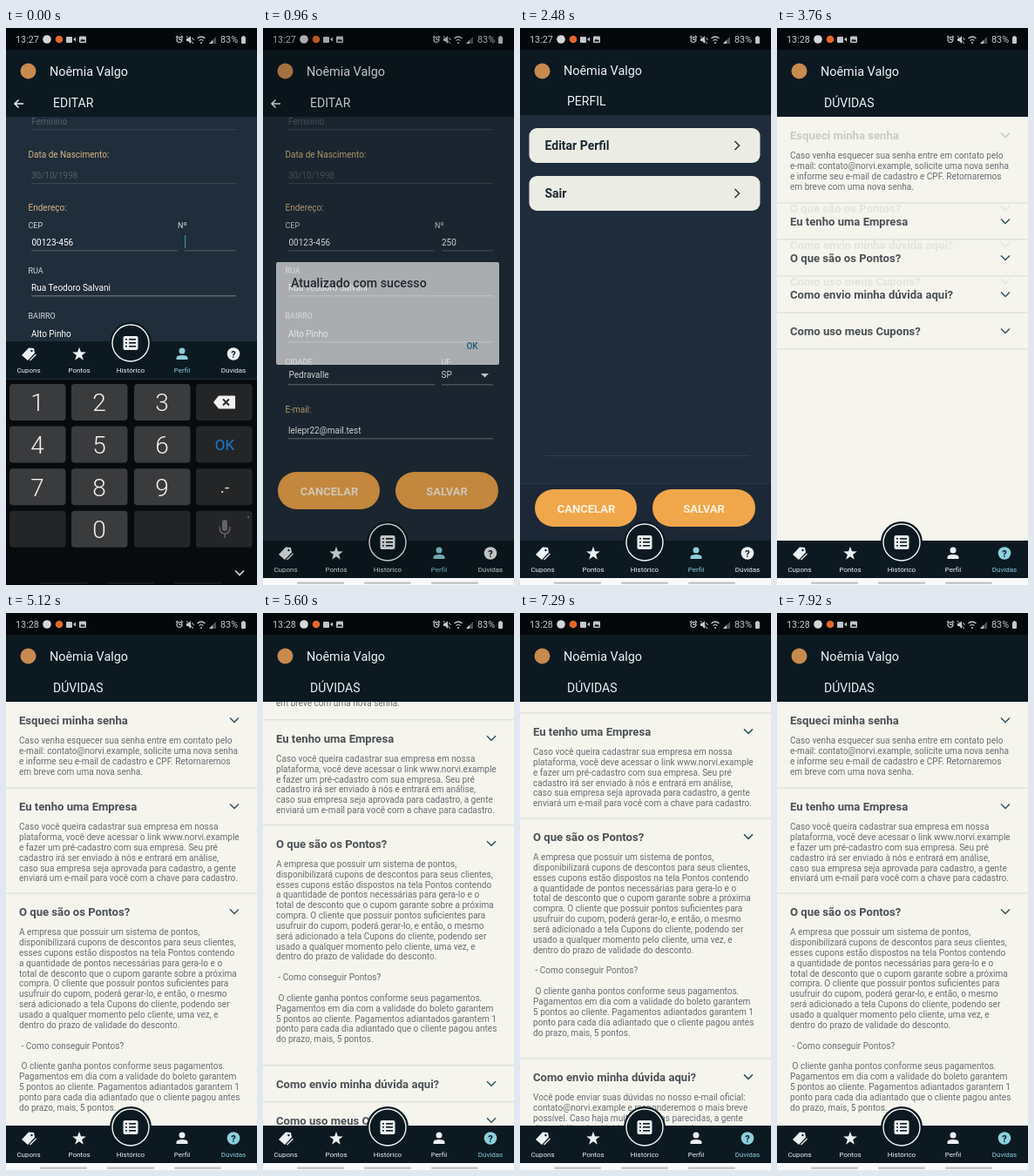
Animation, 288 px wide and 640 px high, one loop 8000 ms. Source, as an HTML page with a canvas:

```html
<!DOCTYPE html>
<html lang="pt-BR">
<head>
<meta charset="utf-8">
<title>Perfil e dúvidas</title>
<style>
  html, body { margin: 0; width: 100%; height: 100%; overflow: hidden; background: #000; }
  canvas { display: block; width: 100vw; height: 100vh; }
</style>
</head>
<body>
<canvas id="stage"></canvas>
<script>
const W = 288, H = 640, LOOP = 8000;
const canvas = document.getElementById('stage');
const dpr = window.devicePixelRatio || 1;
canvas.width = W * dpr;
canvas.height = H * dpr;
const c = canvas.getContext('2d');

const DARK = '#0c1921', BODY = '#202d3a', PAPER = '#f5f5ee', ACTIVE = '#8bd0dc';
const GOLD = '#d3b583', ORANGE = '#f0a64b', MUTED = '#535e69', WHITE = '#eef1f2';
const USER = 'Noêmia Valgo';

const FAQ = [
  { title: 'Esqueci minha senha', height: 57, opens: 3700, body:
`Caso venha esquecer sua senha entre em contato pelo
e-mail: contato@norvi.example, solicite uma nova senha
e informe seu e-mail de cadastro e CPF. Retornaremos
em breve com uma nova senha.` },
  { title: 'Eu tenho uma Empresa', height: 79, opens: 4250, body:
`Caso você queira cadastrar sua empresa em nossa
plataforma, você deve acessar o link www.norvi.example
e fazer um pré-cadastro com sua empresa. Seu pré
cadastro irá ser enviado à nós e entrará em análise,
caso sua empresa seja aprovada para cadastro, a gente
enviará um e-mail para você com a chave para cadastro.` },
  { title: 'O que são os Pontos?', height: 234, opens: 4800, body:
`A empresa que possuir um sistema de pontos,
disponibilizará cupons de descontos para seus clientes,
esses cupons estão dispostos na tela Pontos contendo
a quantidade de pontos necessárias para gera-lo e o
total de desconto que o cupom garante sobre a próxima
compra. O cliente que possuir pontos suficientes para
usufruir do cupom, poderá gerar-lo, e então, o mesmo
será adicionado a tela Cupons do cliente, podendo ser
usado a qualquer momento pelo cliente, uma vez, e
dentro do prazo de validade do desconto.

 - Como conseguir Pontos?

 O cliente ganha pontos conforme seus pagamentos.
Pagamentos em dia com a validade do boleto garantem
5 pontos ao cliente. Pagamentos adiantados garantem 1
ponto para cada dia adiantado que o cliente pagou antes
do prazo, mais, 5 pontos.` },
  { title: 'Como envio minha dúvida aqui?', height: 69, opens: 5950, body:
`Você pode enviar suas dúvidas no nosso e-mail oficial:
contato@norvi.example e responderemos o mais breve
possível. Caso haja muitas dúvidas parecidas, a gente
disponibilizará a dúvida nessa mesma tela para que
todos possam verificar.` },
  { title: 'Como uso meus Cupons?', height: 0, opens: Infinity, body: '' }
];

// Drawing helpers
const clamp = v => Math.max(0, Math.min(1, v));
const ramp = (t, from, to) => clamp((t - from) / (to - from));
const ease = (t, from, to) => { const p = ramp(t, from, to); return p * p * (3 - 2 * p); };

function text(s, x, y, size, color, weight = 400, align = 'left') {
  c.font = `${weight} ${size}px Roboto, sans-serif`;
  c.textAlign = align;
  c.fillStyle = color;
  c.fillText(s, x, y + size * 0.355);
}
function rect(x, y, w, h, color, radius = 0) {
  c.fillStyle = color;
  c.beginPath();
  c.roundRect(x, y, w, h, radius);
  c.fill();
}
function circle(x, y, r, color) {
  c.fillStyle = color;
  c.beginPath();
  c.arc(x, y, r, 0, Math.PI * 2);
  c.fill();
}
function path(d, color, width = 0) {
  const p = new Path2D(d);
  if (width) {
    c.strokeStyle = color;
    c.lineWidth = width;
    c.stroke(p);
  } else {
    c.fillStyle = color;
    c.fill(p);
  }
}
function at(x, y, draw) {
  c.save();
  c.translate(x, y);
  draw();
  c.restore();
}
function faded(alpha, draw) {
  c.save();
  c.globalAlpha *= alpha;
  draw();
  c.restore();
}

// Shared chrome
function statusBar(t) {
  const grey = '#c3c7c9';
  rect(0, 0, W, 25, '#04080b');
  text(t < 2960 ? '13:27' : '13:28', 11, 13.5, 10.8, grey);
  circle(47, 13, 4.8, '#d4d7d8');
  circle(61, 13, 4.3, '#e2682c');
  rect(69, 10, 7, 7, grey, 1);
  path('M77 13l3-2.5v5z', grey);
  rect(84, 9.5, 8, 7.5, grey, 1);
  path('M85 15.5l2-3 1.5 1.5 1.2-1 1.5 2.5z', '#111');
  at(199, 13.5, () => {
    path('M3 0a3 3 0 1 1-6 0a3 3 0 1 1 6 0M0-2v2h2M-4-2.5l2-2M4-2.5l-2-2', grey, 1.2);
  });
  path('M207 12h2l3-3v9l-3-3h-2z', grey);
  path('M207 9l8 9M213.5 11l2 3', grey, 1);
  path('M219.5 12q4.5-4 9 0M221.5 14.5q2.5-2 5 0', grey, 1.2);
  circle(224, 17, 1, grey);
  path('M233 18h8v-8z', '#4c5254');
  path('M233 18h4v-4z', grey);
  text('83%', 246, 13.5, 10.8, grey);
  rect(270, 10, 5, 8, grey, 1);
  rect(271.5, 9, 2, 2, grey);
}
function header(title, bottom, back) {
  rect(0, 25, W, bottom - 25, DARK);
  circle(25.5, 49.5, 9, '#c98a4e');
  text(USER, 50, bottom / 2 - 0.7, 14.4, WHITE);
  text(title, 54, bottom - 16, 14, WHITE);
  if (back) path('M20 87H10M14.5 82.5L10 87l4.5 4.5', WHITE, 1.5);
}
function navBar(y, active) {
  rect(0, y, W, 43, DARK);
  circle(143, y + 2, 24, DARK);
  c.beginPath();
  c.arc(143, y + 2, 21, 0, Math.PI * 2);
  c.strokeStyle = '#f2f4f4';
  c.lineWidth = 1.4;
  c.stroke();
  rect(134.5, y - 6, 17, 16, WHITE, 2);
  for (let row = 0; row < 3; row++) {
    rect(137, y - 3 + row * 4, 2, 1.6, DARK);
    rect(141, y - 3 + row * 4, 8, 1.6, DARK);
  }
  const tint = name => name === active ? ACTIVE : WHITE;
  [['Cupons', 26], ['Pontos', 84], ['Histórico', 143], ['Perfil', 202], ['Dúvidas', 261]]
    .forEach(([name, x]) => text(name, x, y + 33.5, 8, tint(name), 400, 'center'));
  at(26, y + 14, () => {
    path('M-8 2L0-6.5l6 .5 1 5.5L-1 8z', WHITE);
    path('M1.5 8l7-7', WHITE, 1.3);
    circle(3.5, -3, 1.2, DARK);
  });
  at(84, y + 15, () => {
    c.fillStyle = WHITE;
    c.beginPath();
    for (let i = 0; i < 10; i++) {
      const a = i * Math.PI / 5, r = i % 2 ? 3.3 : 8.2;
      c.lineTo(Math.sin(a) * r, -Math.cos(a) * r);
    }
    c.fill();
  });
  circle(202, y + 11, 3.5, tint('Perfil'));
  path(`M195.5 ${y + 21}v-2q0-3 6.5-3t6.5 3v2z`, tint('Perfil'));
  circle(261, y + 14.5, 7.3, tint('Dúvidas'));
  text('?', 261, y + 14.8, 11, DARK, 700, 'center');
}
function systemBar() {
  rect(0, 632, W, 8, '#fafafa');
  [39, 116, 193].forEach(x => rect(x, 636.5, 54, 2.5, '#c4c6c7', 1));
}
function chevron(x, y, color, right) {
  path(right ? `M${x - 2.5} ${y - 5}l5 5l-5 5` : `M${x - 5} ${y - 2.5}l5 5l5-5`, color, 1.5);
}
function actionButtons(savePressed) {
  rect(17, 510, 117, 43, ORANGE, 21.5);
  text('CANCELAR', 76, 532, 13, '#fff3df', 700, 'center');
  faded(savePressed ? 0.4 : 1, () => {
    rect(152, 510, 118, 43, ORANGE, 21.5);
    text('SALVAR', 211, 532, 13, '#fff3df', 700, 'center');
  });
}

// Edit form
function underline(x, y, right, color = '#68737c') {
  rect(x, y, right - x, 0.8, color);
}
function keyboard(y) {
  at(0, y, () => {
    rect(0, 404, W, 236, '#080b0e');
    const columns = [4, 75, 147, 218];
    for (let row = 0; row < 4; row++) {
      columns.forEach((x, col) => {
        const top = 409 + row * 48.6;
        const digit = row < 3 && col < 3 ? String(row * 3 + col + 1) : row === 3 && col === 1 ? '0' : '';
        rect(x, top, 64.5, 42, digit ? '#3a3b3d' : '#242527', 4);
        if (digit) text(digit, x + 32, top + 21.5, 28, '#f1f1f1', 300, 'center');
      });
    }
    path('M238 430l6-7.5h19v15h-19z', '#f0f0f0');
    path('M249 426.5l7 7m0-7l-7 7', '#242527', 1.8);
    text('OK', 251, 479, 17, '#1979d5', 400, 'center');
    text('.-', 251, 527, 19, '#e8e8e8', 400, 'center');
    rect(248, 565, 6, 13, '#626466', 3);
    path('M245 573q0 8 6 8t6-8M251 581v5', '#626466', 1.4);
    circle(278, 562, 1, '#707274');
    path('M263 623.5l5 5l5-5', '#d8d8d8', 1.6);
    [39, 116, 193].forEach(x => rect(x, 637, 54, 2, '#17191b'));
  });
}
function dialog(alpha) {
  faded(alpha * 0.28, () => rect(0, 0, W, H, '#000'));
  faded(alpha, () => rect(15, 269, 256, 118, '#f0f1f1', 2));
  faded(clamp(alpha * 1.5), () => {
    text('Atualizado com sucesso', 32, 293, 14.2, '#20292f', 500);
    text('OK', 240, 365, 10, '#1f587c', 500, 'center');
  });
}
function editPage(t) {
  rect(0, 102, W, 538, BODY);
  text('Feminino', 29, 107, 10, MUTED);
  underline(29, 116.5, 264, '#46525d');
  text('Data de Nascimento:', 25.5, 145, 10, GOLD);
  text('30/10/1998', 29, 169, 10, MUTED);
  underline(29, 178, 264, '#46525d');
  text('Endereço:', 25.5, 206, 10, GOLD);
  const label = (s, x, y) => text(s, x, y, 9, '#d5dadd');
  const value = (s, x, y) => text(s, x, y, 10, '#fff');
  label('CEP', 25.5, 226.5);
  value('00123-456', 29.5, 246);
  underline(29, 255.5, 197);
  label('Nº', 197, 226.5);
  const typed = '250'.slice(0, [160, 260, 360].filter(k => t >= k).length);
  value(typed, 205, 246);
  underline(205, 255.5, 264);
  if (t < 500) rect(205 + typed.length * 5.6, 238, 1.2, 15, '#2f9a9c');
  label('RUA', 25.5, 279);
  value('Rua Teodoro Salvani', 29, 298.5);
  underline(29, 307.5, 264, '#929ba2');
  label('BAIRRO', 25.5, 331);
  value('Alto Pinho', 29, 351);
  underline(29, 360.5, 264, '#929ba2');
  label('CIDADE', 25.5, 384);
  value('Pedravalle', 29.5, 398.5);
  underline(29, 409.5, 197, '#929ba2');
  label('UF', 204.5, 384);
  value('SP', 204.5, 398.5);
  path('M250 397h9l-4.5 4.5z', WHITE);
  underline(205, 409.5, 264, '#929ba2');
  text('E-mail:', 25.5, 438, 10, GOLD);
  value('lelepr22@mail.test', 29, 462.5);
  underline(29, 471.5, 264, '#929ba2');
  actionButtons(t > 700 && t < 820);

  header('EDITAR', 102, true);
  statusBar(t);
  const slide = ease(t, 480, 600) * 236;
  const popup = Math.min(ramp(t, 894, 994), 1 - ramp(t, 1600, 1720));
  navBar(Math.min(589, 360 + slide), 'Perfil');
  if (popup > 0) dialog(popup);
  systemBar();
  if (slide < 236) keyboard(slide);
}

// Profile menu, with the form's lower part sliding away beneath it
function profilePage(t) {
  rect(0, 100, W, 540, '#1f2c3c');
  if (t < 2720) {
    at(0, 20 * ramp(t, 2400, 2470), () => {
      rect(0, 503, W, 86, '#1c2836');
      underline(29, 471, 264, '#3a4652');
      underline(0, 503, W, '#2c3945');
      actionButtons(false);
    });
  }
  [['Editar Perfil', 115], ['Sair', 170]].forEach(([name, y]) => {
    rect(10.5, y, 265, 40, '#ebece4', 9);
    text(name, 28.5, y + 20.5, 14, '#1c2830', 700);
    chevron(249, y + 20, '#26333b', true);
  });
  header('PERFIL', 100, false);
  statusBar(t);
  systemBar();
  navBar(589, 'Perfil');
}

// Questions list
function faqTitle(item, y) {
  text(item.title, 15, y - 0.6, 13.1, '#4b5155', 700);
  chevron(262, y - 1, '#35525d');
}
function faqPage(t) {
  rect(0, 102, W, 538, PAPER);
  const scroll = 114 * ease(t, 5350, 5750) + 69 * ease(t, 6120, 6440) - 183 * ease(t, 7000, 7560);
  const opening = FAQ.findIndex(f => t >= f.opens && t < f.opens + 140);
  let y = 124 - scroll;
  FAQ.forEach((item, i) => {
    const age = t - item.opens;
    faded(age >= 0 ? 0.25 + 0.75 * ramp(age, 80, 240) : 1, () => faqTitle(item, y));
    if (opening >= 0 && i > opening + 1) {
      faded(0.09, () => faqTitle(item, y - FAQ[opening].height));
    }
    if (age >= 0) {
      item.body.split('\n').forEach((line, n) => text(line, 15, y + 22.6 + n * 11.85, 10.07, '#696d70'));
      y += item.height;
    }
    y += 42;
    rect(0, y - 22.5, W, 1, '#d8d9d3');
  });
  header('DÚVIDAS', 102, false);
  statusBar(t);
  systemBar();
  navBar(589, 'Dúvidas');
}

function frame(now) {
  const t = now % LOOP;
  c.setTransform(dpr, 0, 0, dpr, 0, 0);
  c.globalAlpha = 1;
  if (t < 2400) editPage(t);
  else if (t < 3080) profilePage(t);
  else faqPage(t);
}

const start = performance.now();
function tick() {
  frame(performance.now() - start);
  requestAnimationFrame(tick);
}
tick();
</script>
</body>
</html>
```
